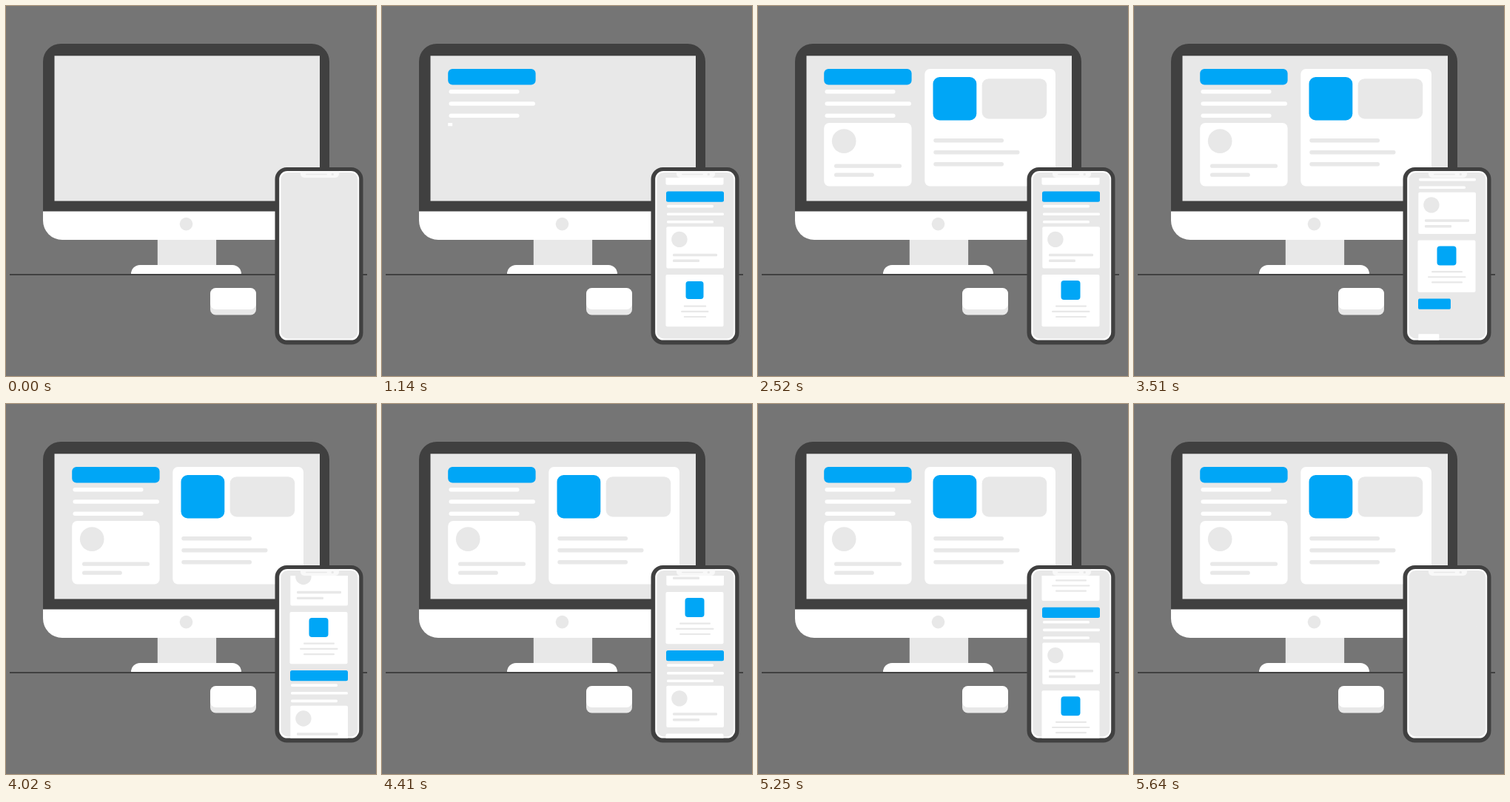
An HTML page without scripts for the animation above (6330 ms loop, 500 px wide and 500 px high).

```html
<!DOCTYPE html>
<html lang="en">
<head>
<meta charset="utf-8">
<title>Responsive layout</title>
<style>
  @property --t { syntax: "<number>"; inherits: true; initial-value: 0; }
  @keyframes clock { to { --t: 6330; } }

  html, body { margin: 0; width: 100%; height: 100%; overflow: hidden; background: #757575; }
  svg { display: block; width: 100%; height: 100%; --o: 0; animation: clock 6330ms linear infinite; }

  .dark { fill: #404040; }
  .white { fill: #fff; }
  .grey { fill: #e8e8e8; }
  .blue { fill: #00a6f6; }

  /* --s start, --d duration, --o group offset, all in ms */
  .x, .xy {
    --p: clamp(0, (var(--t) - var(--s) - var(--o)) / var(--d, 450), 1);
    --e: calc(var(--p) * var(--p) * (3 - 2 * var(--p)));
    transform-box: fill-box;
    transform-origin: 0 0;
  }
  .x { scale: var(--e) 1; }
  .xy { scale: var(--e) var(--e); }
  .mid { transform-origin: 50% 50%; }

  .feed { opacity: clamp(0, 5640 - var(--t), 1); }
  .scroll { transform: translateY(calc(clamp(0, (var(--t) - 2840) / 2760, 1) * -191.5px)); }
</style>
</head>
<body>
<svg viewBox="0 0 500 500">
  <defs>
    <clipPath id="view"><rect x="369.5" y="232" width="107.5" height="219.5" rx="0"/></clipPath>

    <g id="tile">
      <rect class="white xy" style="--s:330;--d:566" x="383.5" y="363" width="78" height="70.3" rx="2"/>
      <rect class="blue xy mid" style="--s:760;--d:460" x="409.5" y="371" width="26" height="26" rx="4"/>
      <g class="grey" style="--s:840;--d:460">
        <rect class="x mid" x="402" y="404.5" width="42" height="2.2" rx="1"/>
        <rect class="x mid" x="397" y="411.7" width="51.5" height="2.2" rx="1"/>
        <rect class="x mid" x="402" y="418.9" width="42" height="2.2" rx="1"/>
      </g>
    </g>

    <g id="page">
      <rect class="blue x" style="--s:150;--d:555" x="384" y="250.5" width="78" height="14.2" rx="2.5"/>
      <g class="white" style="--d:400">
        <rect class="x" style="--s:450" x="385" y="268.8" width="63" height="3.6" rx="1.6"/>
        <rect class="x" style="--s:480" x="385" y="279.4" width="77" height="3.6" rx="1.6"/>
        <rect class="x" style="--s:510" x="385" y="290" width="63" height="3.6" rx="1.6"/>
      </g>
      <rect class="white xy" style="--s:240;--d:520" x="384.3" y="298.3" width="77.7" height="56.2" rx="2"/>
      <g class="grey">
        <circle class="xy mid" style="--s:520;--d:400" cx="401.9" cy="315.4" r="10.7"/>
        <rect class="x" style="--s:560;--d:480" x="393" y="334.8" width="60" height="3.4" rx="1.2"/>
        <rect class="x" style="--s:560;--d:480" x="393" y="342.6" width="36" height="3.4" rx="1.2"/>
      </g>
      <use href="#tile"/>
    </g>
  </defs>

  <!-- Desktop computer -->
  <path class="dark" d="M50 278V75a24 24 0 0 1 24-24H413a24 24 0 0 1 24 24V278z"/>
  <rect class="grey" x="65.5" y="67.3" width="358.5" height="196.2"/>
  <path class="white" d="M50 277.5H437V290a26 26 0 0 1-26 26H76a26 26 0 0 1-26-26z"/>
  <circle class="grey" cx="243.5" cy="294.6" r="8.8"/>
  <rect class="grey" x="204.8" y="316" width="79.3" height="34.5"/>
  <path class="white" d="M169 362a12 12 0 0 1 12-12H306a12 12 0 0 1 12 12z"/>
  <path d="M5 363H488" stroke="#404040" stroke-width="2.2"/>

  <!-- Mouse -->
  <rect class="grey" x="276" y="385" width="62" height="32.5" rx="7.5"/>
  <rect class="white" x="276" y="381" width="62" height="29" rx="7.5"/>

  <!-- Desktop page -->
  <rect class="blue x" style="--s:150" x="89.2" y="85" width="118.4" height="21.5" rx="6"/>
  <g class="white" style="--d:420">
    <rect class="x" style="--s:390" x="90.5" y="113" width="95" height="5.5" rx="2.7"/>
    <rect class="x" style="--s:510" x="90.5" y="129.2" width="116.5" height="5.5" rx="2.7"/>
    <rect class="x" style="--s:630" x="90.5" y="145.4" width="95" height="5.5" rx="2.7"/>
  </g>
  <rect class="white xy" style="--s:1080" x="89.2" y="158" width="118.4" height="85.6" rx="7"/>
  <g class="grey" style="--d:400">
    <circle class="xy mid" style="--s:1350" cx="116.2" cy="182.6" r="16.3"/>
    <rect class="x" style="--s:1400" x="103" y="213.4" width="91" height="5.4" rx="2.6"/>
    <rect class="x" style="--s:1460" x="103" y="225.4" width="53.8" height="5.4" rx="2.6"/>
  </g>
  <rect class="white xy" style="--s:1400" x="225.3" y="85" width="176.7" height="158.6" rx="7"/>
  <rect class="blue xy mid" style="--s:1700" x="236.5" y="96" width="58.8" height="58.5" rx="9"/>
  <g class="grey">
    <rect class="xy mid" style="--s:1800" x="302.7" y="98.2" width="87.5" height="54.2" rx="9"/>
    <rect class="x" style="--s:1950" x="237.3" y="179" width="94.7" height="5.4" rx="2.6"/>
    <rect class="x" style="--s:2010" x="237.3" y="195" width="116.2" height="5.4" rx="2.6"/>
    <rect class="x" style="--s:2070" x="237.3" y="211" width="94.7" height="5.4" rx="2.6"/>
  </g>

  <!-- Phone -->
  <rect class="dark" x="363.5" y="218" width="119" height="239.5" rx="16"/>
  <rect class="white" x="369.2" y="223" width="108" height="228.6" rx="11"/>
  <rect class="grey" x="371.4" y="225" width="104" height="224.4" rx="9.5"/>
  <path fill="#f8f8f8" d="M398 223.5H450V227a5 5 0 0 1-5 5H403a5 5 0 0 1-5-5z"/>
  <rect class="grey" x="405" y="226.7" width="29" height="1.6" rx=".8"/>
  <circle class="grey" cx="441.3" cy="227.4" r="1.7"/>
  <g class="feed" clip-path="url(#view)">
    <g class="scroll">
      <use href="#tile" y="-191.5"/>
      <use href="#page"/>
      <use href="#page" y="191.5" style="--o:3060"/>
    </g>
  </g>
</svg>
</body>
</html>
```
